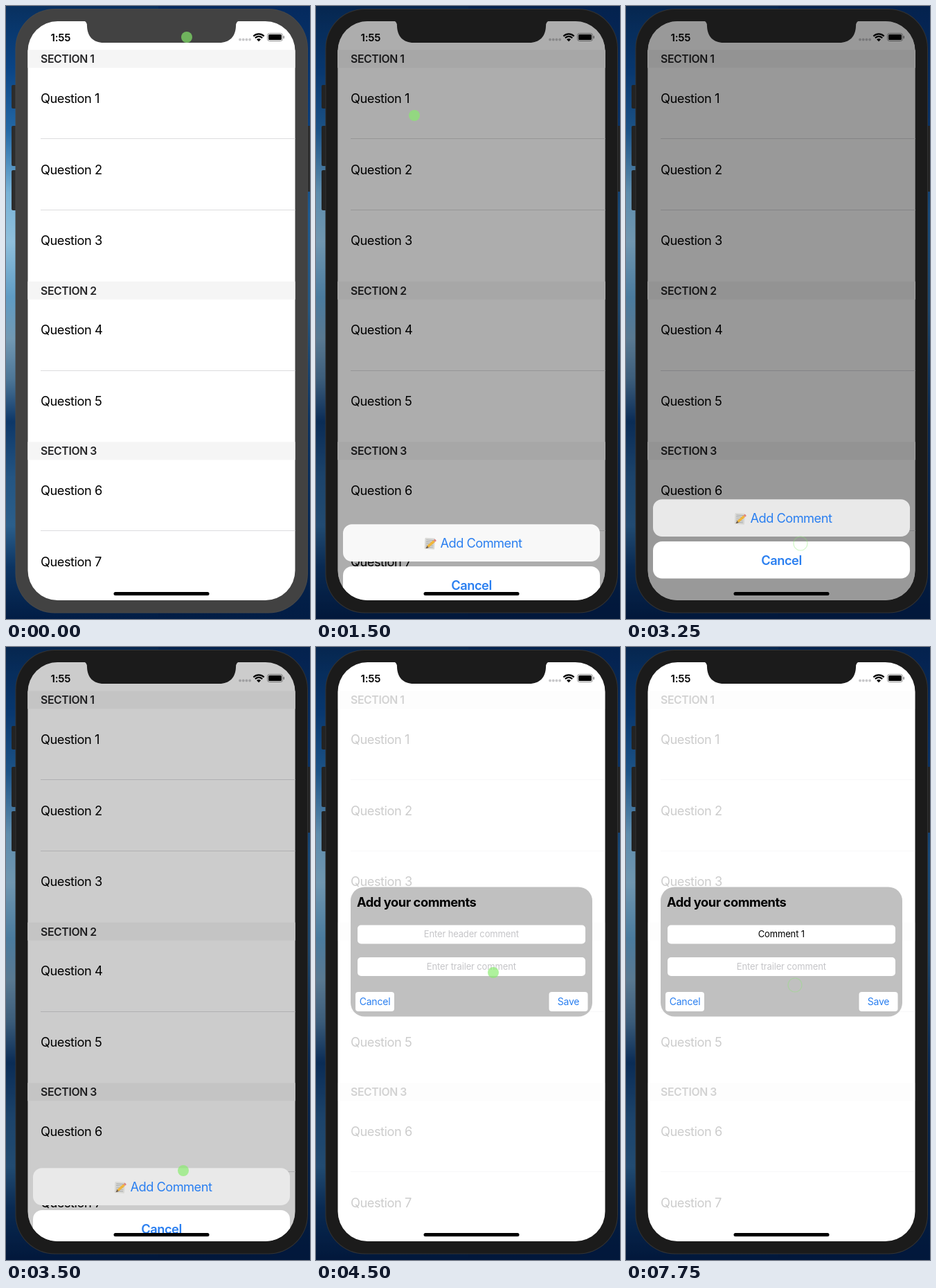
These frames come from a looping animation (439 by 885 pixels, 8000 ms). An HTML page with a canvas:

```html
<!DOCTYPE html>
<html lang="en">
<head>
<meta charset="utf-8">
<title>Add a comment</title>
<style>
html, body { margin: 0; width: 100%; height: 100%; overflow: hidden; background: #05224d; }
canvas { display: block; width: 439px; height: 885px; }
</style>
</head>
<body>
<canvas id="stage"></canvas>
<script>
const W = 439, H = 885, LOOP = 8000, STEP = 250;
const BLUE = '#2a7ff0';
const canvas = document.getElementById('stage');
const c = canvas.getContext('2d');
const dpr = window.devicePixelRatio || 1;
canvas.width = W * dpr;
canvas.height = H * dpr;

const clamp = v => Math.max(0, Math.min(1, v));

function box(x, y, w, h, r, fill) {
  c.beginPath();
  c.roundRect(x, y, w, h, r);
  c.fillStyle = fill;
  c.fill();
}

function circle(x, y, r, fill) {
  c.beginPath();
  c.arc(x, y, r, 0, Math.PI * 2);
  c.fillStyle = fill;
  c.fill();
}

function text(str, x, y, size, { weight = 400, color = '#000', align = 'left', track = 0 } = {}) {
  c.font = `${weight} ${size}px Inter, "Liberation Sans", sans-serif`;
  c.letterSpacing = track + 'px';
  c.textAlign = align;
  c.fillStyle = color;
  c.fillText(str, x, y);
}

function verticalFill(x, w, stops) {
  const g = c.createLinearGradient(0, 0, 0, H);
  for (const [y, color] of stops) g.addColorStop(y / H, color);
  c.fillStyle = g;
  c.fillRect(x, 0, w, H);
}

function drawWallpaper(active) {
  verticalFill(0, 220, [
    [0, '#08305f'], [90, '#0a4485'], [180, '#2469a6'], [270, '#78b2d6'], [340, '#8fbfdb'],
    [420, '#5f9cc4'], [480, '#7299b3'], [540, '#4c7596'], [600, '#0d3768'], [680, '#245582'],
    [750, '#2b5f8b'], [810, '#0c3462'], [885, '#021d45']
  ]);
  verticalFill(220, 219, [
    [0, '#052a5e'], [160, '#0a3c78'], [300, '#1d5a90'], [440, '#245780'],
    [600, '#0b3260'], [885, '#021d45']
  ]);
  if (active) {
    c.fillStyle = 'rgba(0,5,25,.22)';
    c.fillRect(0, 0, W, H);
  }
}

function drawBody(active) {
  const side = active ? '#232323' : '#2c2c2c';
  for (const [y, h] of [[114, 34], [173, 58], [237, 58]]) box(8, y, 8, h, 2, side);
  box(433, 173, 8, 95, 2, side);
  box(13.5, 4, 422.5, 872.5, 57, active ? '#333' : '#484848');
  box(14.5, 5, 420.5, 870.5, 56, active ? '#1b1b1b' : '#424242');
}

function drawList() {
  let y = 63.3, question = 1;
  [3, 2, 2].forEach((rows, i) => {
    c.fillStyle = '#f5f5f5';
    c.fillRect(31, y, 387, 26);
    text('SECTION ' + (i + 1), 50, y + 19, 15.8, { weight: 600, color: '#262628', track: -0.38 });
    y += 26;
    for (let r = 0; r < rows; r++) {
      text('Question ' + question++, 50, y + 50.4, 18.3, { track: -0.5 });
      y += 102.8;
      if (r < rows - 1) {
        c.fillStyle = '#dcdcde';
        c.fillRect(50, Math.round(y) - 1, 368, 1);
      }
    }
  });
}

function drawStatus() {
  text('1:55', 64.5, 50.5, 15, { weight: 600, track: -0.2 });
  for (let i = 0; i < 4; i++) circle(338 + i * 4.7, 48.5, 1.9, '#c8c8ca');

  c.save();
  c.beginPath();
  c.moveTo(365, 51.2);
  c.lineTo(356, 42.2);
  c.lineTo(356, 36);
  c.lineTo(374, 36);
  c.lineTo(374, 42.2);
  c.closePath();
  c.clip();
  c.strokeStyle = '#000';
  c.lineWidth = 2.2;
  for (const r of [10.2, 6.6]) {
    c.beginPath();
    c.arc(365, 50.5, r, Math.PI, 0);
    c.stroke();
  }
  circle(365, 50.5, 3.6, '#000');
  c.restore();

  c.strokeStyle = '#8d8d8d';
  c.lineWidth = 1;
  c.beginPath();
  c.roundRect(377.5, 39.5, 22, 11, 3);
  c.stroke();
  box(379, 41, 19, 8, 1.6, '#000');
  box(400.5, 43, 1.5, 4, 1, '#8d8d8d');
}

function drawNotch(active) {
  c.beginPath();
  c.moveTo(110, 21);
  c.quadraticCurveTo(117, 21, 117, 29);
  c.bezierCurveTo(117.5, 44, 126, 53, 141, 53);
  c.lineTo(308, 53);
  c.bezierCurveTo(323, 53, 331.5, 44, 332, 29);
  c.quadraticCurveTo(332, 21, 339, 21);
  c.closePath();
  c.fillStyle = active ? '#1b1b1b' : '#424242';
  c.fill();
}

function drawMemo(x, y) {
  c.save();
  c.translate(x, y);
  c.rotate(0.06);
  box(-7.5, -8, 14.5, 16, 1, '#d9d9d6');
  c.fillStyle = '#a3a6a8';
  for (let i = 0; i < 5; i++) c.fillRect(-5.5, -5.5 + i * 2.6, 10.5, 0.9);
  c.rotate(-0.78);
  box(-5, -0.5, 12, 3.6, 0.5, '#f0b53a');
  box(7, -0.5, 3, 3.6, 1, '#e2857c');
  c.beginPath();
  c.moveTo(-5, -0.5);
  c.lineTo(-9, 1.3);
  c.lineTo(-5, 3.1);
  c.fillStyle = '#6b5540';
  c.fill();
  c.restore();
}

function drawSheet(offset, pressed) {
  const y = 712.3 + offset;
  box(39, y, 371, 53.7, 13, pressed ? '#e9e9e9' : '#f8f8f8');
  drawMemo(164.5, y + 28);
  text('Add Comment', 179.5, y + 33.7, 18.3, { color: BLUE, track: -0.55 });
  box(39, y + 60.7, 371, 53.5, 13, '#fff');
  text('Cancel', 224.5, y + 94.3, 18.3, { weight: 600, color: BLUE, align: 'center', track: -0.5 });
}

function drawDialog(typed, caret) {
  const field = { align: 'center', track: -0.15 };
  const hint = { ...field, color: '#c5c5c8' };
  box(50, 346.5, 349, 187, 20, '#c0c0c0');
  text('Add your comments', 59, 375, 18.3, { weight: 700, track: -0.45 });
  box(60, 401.5, 329, 27, 5, '#fff');
  box(60, 448, 329, 27, 5, '#fff');
  text('Enter trailer comment', 224.3, 466, 13, hint);
  if (typed) text(typed, 224.3, 419.3, 13, field);
  else text('Enter header comment', 224.3, 419.3, 13, hint);
  if (caret) {
    c.font = '400 13px Inter, "Liberation Sans", sans-serif';
    c.letterSpacing = '-0.15px';
    const half = typed ? c.measureText(typed).width / 2 : 0;
    c.fillStyle = '#4668e0';
    c.fillRect(224.3 + half, 405.5, 2, 17.5);
  }
  const label = { color: BLUE, align: 'center', track: -0.2 };
  box(57, 498, 56, 28, 4, '#fff');
  text('Cancel', 85, 517.3, 14, label);
  box(336.5, 498, 56, 28, 4, '#fff');
  text('Save', 364.5, 517.3, 14, label);
}

// Pointer stops as [ms, x, y]; it holds each place until the next one.
const stops = [
  [0, 261, 45], [250, 138, 155], [750, 142, 158], [2250, 170, 320], [2500, 232, 640],
  [2750, 256, 756], [4250, 256, 520], [4500, 256, 470], [4750, 255, 419], [7500, 248, 468]
];
const taps = [1250, 3250, 5250, 7750];

function drawPointer(t) {
  const [, x, y] = stops.filter(s => s[0] <= t).pop();
  if (taps.includes(t)) {
    c.beginPath();
    c.arc(x - 4, y + 20, 10, 0, Math.PI * 2);
    c.strokeStyle = 'rgba(134,236,108,.38)';
    c.lineWidth = 1.2;
    c.stroke();
  } else {
    circle(x, y, 8, 'rgba(134,236,108,.67)');
  }
}

const counts = [1, 2, 4, 6, 7, 8, 9];

function typedAt(t) {
  if (t < 5750) return '';
  const i = Math.min(counts.length - 1, (t - 5750) / STEP);
  return 'Comment 1'.slice(0, counts[i]);
}

function draw(t) {
  const active = t >= 750;
  c.setTransform(dpr, 0, 0, dpr, 0, 0);
  drawWallpaper(active);
  drawBody(active);

  c.save();
  c.beginPath();
  c.roundRect(31.5, 22, 386, 836, 43);
  c.fillStyle = '#fff';
  c.fill();
  c.clip();

  const shown = clamp((t - 3850) / 250);
  c.globalAlpha = 1 - 0.8 * shown;
  drawList();
  c.globalAlpha = 1;
  drawStatus();

  if (t >= 1500 && t < 3750) {
    const leave = clamp((t - 3350) / 300);
    const offset = 150 * Math.exp(-(t - 1400) / 70) + 160 * leave * leave;
    const dim = 0.4 * clamp((t - 1300) / 250) * (1 - leave);
    c.fillStyle = `rgba(0,0,0,${dim})`;
    c.fillRect(31, 22, 387, 836);
    drawSheet(offset, t >= 3250);
  }
  if (shown > 0) {
    c.globalAlpha = shown;
    drawDialog(typedAt(t), t >= 5250 && t < 7500);
    c.globalAlpha = 1;
  }
  box(155.5, 846, 138, 5, 2.5, '#000');
  c.restore();

  drawNotch(active);
  drawPointer(t);
}

const start = performance.now();

function tick() {
  const t = (performance.now() - start) % LOOP;
  draw(Math.floor(t / STEP) * STEP);
  requestAnimationFrame(tick);
}
tick();
</script>
</body>
</html>
```
